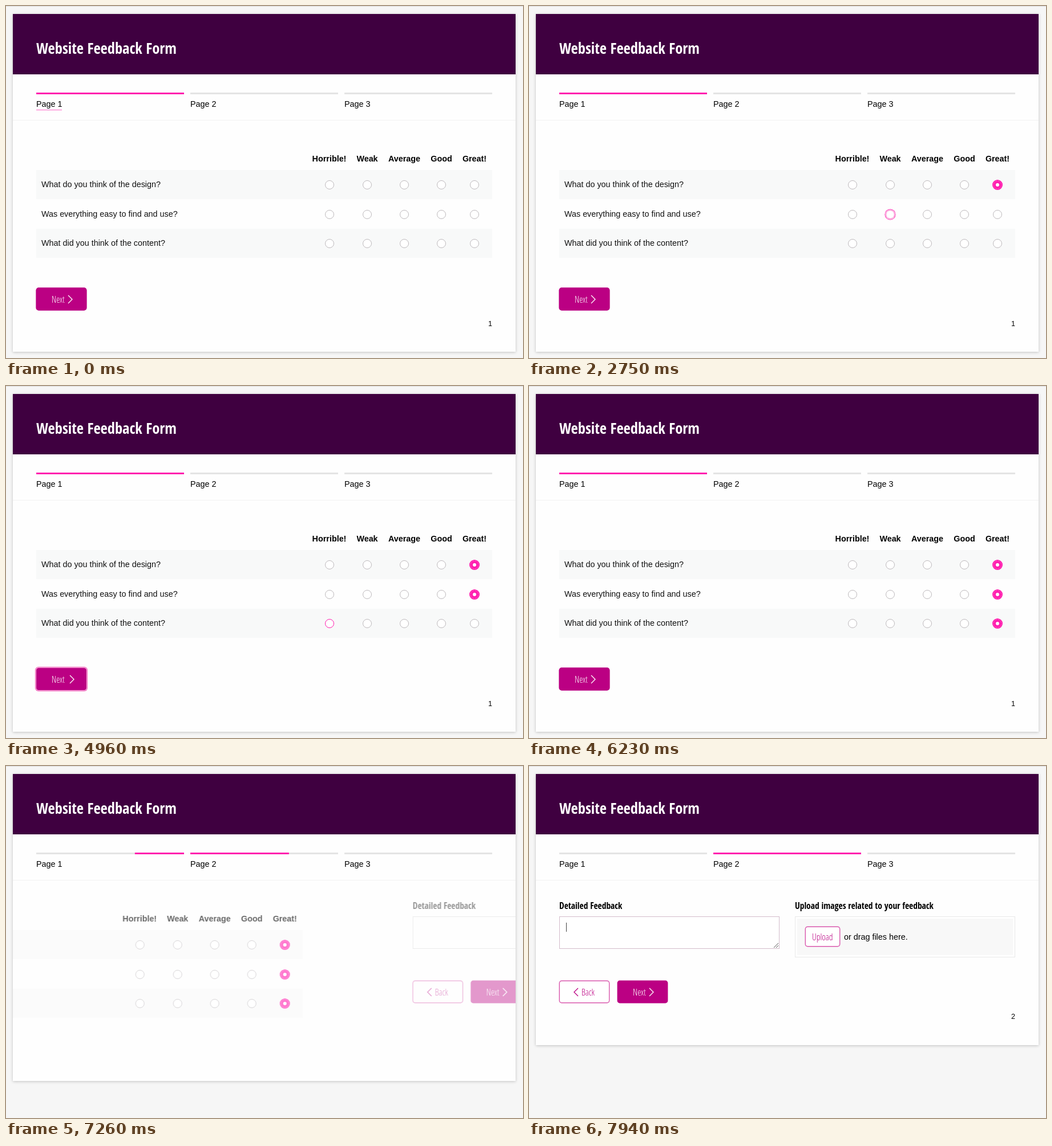
Recreate the animation shown at these times as an HTML page. Size 906 by 618 pixels, loop 7990 ms.

```html
<!DOCTYPE html>
<html lang="en">
<head>
<meta charset="utf-8">
<title>Website Feedback Form</title>
<style>
  :root { --pink: #ff1cae; --plum: #bb0083; }
  html, body { margin: 0; width: 100%; height: 100%; overflow: hidden; }
  body { position: relative; background: #f6f6f6; color: #000; font: 14.35px/20px "Liberation Sans", Arial, sans-serif; }
  * { box-sizing: border-box; }
  div, span, b, i, svg { position: absolute; white-space: nowrap; }
  .cond { font-family: "Open Sans Condensed", "Open Sans", sans-serif; font-stretch: 75%; font-size: 15.5px; font-weight: 700; }
  .edge { inset: 0 0 auto; height: 1px; background: #dcdcdc; }
  .card { left: 12px; top: 14px; width: 881px; height: 593px; overflow: hidden; background: #fefefe; box-shadow: 0 1px 5px rgba(0, 0, 0, .22); }
  .layer { left: -12px; top: -14px; width: 906px; height: 618px; }
  .head { left: 12px; top: 14px; width: 881px; height: 106px; background: #3f0040; }
  .title { left: 53px; top: 54px; font-size: 26.5px; line-height: 40px; color: #fff; }
  .rule { left: 12px; top: 200px; width: 881px; height: 1px; background: #f1f1f1; }
  .bar { top: 152px; width: 259px; height: 3px; overflow: hidden; background: #e4e4e4; }
  .fill { inset: 0; background: var(--pink); }
  .tab { top: 162px; height: 21px; }
  .tab i { left: 0; bottom: 0; width: 100%; height: 1px; background: #ff62c6; opacity: 0; }
  .col { top: 258px; width: 80px; text-align: center; }
  .band { left: 53px; width: 799px; height: 51px; background: #f8f9f9; }
  .ask { left: 62px; color: #111; }
  .radio { width: 16px; height: 16px; border: 1px solid #bdb9bc; border-radius: 50%; background: #fff; }
  .btn {
    --line: var(--plum);
    width: 88px; height: 39px; border: 1px solid var(--line); border-radius: 4px; box-shadow: 0 0 0 .4px var(--line);
    background: var(--plum); color: #fff; font-family: "Open Sans Condensed Light", "Open Sans", sans-serif; font-weight: 300;
  }
  .btn span { top: 9px; left: 26px; }
  .btn svg { top: 11px; left: 54px; }
  .btn.ghost { --line: #d958ad; background: #fff; color: var(--plum); }
  .back span { left: 38px; }
  .back svg { left: 24px; transform: scaleX(-1); }
  svg { fill: none; stroke: currentColor; stroke-width: 1.3; }
  .num { right: 54px; font-size: 12.5px; }
  .area { left: 53px; top: 264px; width: 386px; height: 57px; border: 1px solid #cfcfcf; background: #fff; }
  .caret { left: 11px; top: 10px; width: 1px; height: 16px; background: #444; }
  .drop { left: 466px; top: 264px; width: 386px; height: 72px; border: 1px solid #e8e8e8; background: #fff; }
  .drop div { inset: 3px; background: #f8f8f8; }
</style>
</head>
<body>
<div class="edge"></div>
<div class="card" id="card">
  <div class="layer" id="page1">
    <div class="band" style="top:288px"></div>
    <div class="band" style="top:391px"></div>
    <div class="cond btn" id="next" style="left:53px;top:495px"><span>Next</span>
      <svg id="arrow" width="9" height="16"><path d="M1 1l7 7-7 7"/></svg></div>
    <span class="num" id="num1" style="top:548px">1</span>
  </div>
  <div class="layer" id="page2">
    <b class="cond" style="left:53px;top:235px">Detailed Feedback</b>
    <div class="area" id="area"><i class="caret" id="caret"></i>
      <svg style="right:1px;bottom:1px;color:#555" width="8" height="8"><path d="M0 8L8 0M4 8l4-4" stroke-width="1"/></svg></div>
    <b class="cond" style="left:466px;top:235px">Upload images related to your feedback</b>
    <div class="drop"><div></div></div>
    <div class="cond btn ghost" style="left:484px;top:282px;width:61px;height:35px"><span style="left:11px;top:7px">Upload</span></div>
    <span style="left:552px;top:290px">or drag files here.</span>
    <div class="cond btn ghost back" style="left:53px;top:377px"><span>Back</span>
      <svg width="9" height="16"><path d="M1 1l7 7-7 7"/></svg></div>
    <div class="cond btn" style="left:155px;top:377px"><span>Next</span>
      <svg width="9" height="16"><path d="M1 1l7 7-7 7"/></svg></div>
    <span class="num" id="num2" style="top:430px">2</span>
  </div>
  <div class="layer" id="top">
    <div class="head"></div>
    <b class="cond title">Website Feedback Form</b>
    <div class="rule"></div>
  </div>
</div>
<script>
const LOOP = 7990, FADE = 220, PINK = '#ff1cae', PLUM = '#bb0083';
const $ = id => document.getElementById(id);

function add(parent, cls, left, top, text = '') {
  const el = document.createElement('div');
  el.className = cls;
  if (left != null) el.style.left = left + 'px';
  if (top != null) el.style.top = top + 'px';
  el.textContent = text;
  return parent.appendChild(el);
}

// Each key is [ms, style, easing towards the next key]; keys hold by default.
function play(el, ...keys) {
  const frames = keys.map(([ms, style, easing = 'steps(1, end)']) => ({ ...style, easing, offset: ms / LOOP }));
  frames.push({ ...keys[keys.length - 1][1], offset: 1 });
  el.animate(frames, { duration: LOOP, iterations: Infinity });
}

const show = (el, from, to = LOOP) => play(el,
  ...(from ? [[0, { opacity: 0 }]] : []), [from, { opacity: 1 }], ...(to < LOOP ? [[to, { opacity: 0 }]] : []));

const move = (el, start, span, easing, from, to) =>
  play(el, [0, from], [start, from, easing], [start + span, to]);

// Progress tabs
const tabTimes = [0, 190, 470, 670];
[53, 323, 593].forEach((x, i) => {
  const bar = add($('top'), 'bar', x);
  const tab = add($('top'), 'tab', x, null, 'Page ' + (i + 1));
  const line = tab.appendChild(document.createElement('i'));
  const [on, off] = tabTimes.slice(i);
  show(line, on, off);
  if (i) play(bar, [0, { background: '#e4e4e4' }], [on, { background: '#f3bcdd' }], [off, { background: '#e4e4e4' }]);
  if (i < 2) {
    const at = pct => ({ transform: `translateX(${pct}%)` });
    move(add(bar, 'fill'), 6845, 1068, 'ease', at(i ? -100 : 0), at(i ? 0 : 100));
  }
});

// Radio looks: border, inner fill, gap and outer ring
const look = (border, fill, gap, ring, gapColor = PINK) => ({
  borderColor: border,
  boxShadow: `inset 0 0 0 ${fill}px ${PINK}, 0 0 0 ${gap}px ${gapColor}, 0 0 0 ${ring}px ${PINK}`
});
const OFF = look('#bdb9bc', 0, 0, 0);
const FOCUS = look(PINK, 0, 0, 0);
const START = look('#f59ad2', 0, .8, 1.6, '#ffe3f4');
const ACTIVE = look(PINK, 4, .8, 1.6);
const CHECKED = look(PINK, 4, .8, .8);
const DROPPED = look(PINK, 4, 0, 0);

const columns = [['Horrible!', 566.5], ['Weak', 633], ['Average', 698], ['Good', 763], ['Great!', 821]];
const rows = [
  { ask: 'What do you think of the design?', y: 314, times: [670, 1150, 1390, 1640, 1880, 2350] },
  { ask: 'Was everything easy to find and use?', y: 365.5, times: [2350, 2750, 2930, 3110, 3290, 3820] },
  { ask: 'What did you think of the content?', y: 417, times: [4960, 5180, 5400, 5620, 5820, 6230], peek: 3820 }
];

columns.forEach(([name, x]) => add($('page1'), 'col', x - 40, null, name).style.fontWeight = 700);
rows.forEach(({ ask, y, times, peek }) => {
  add($('page1'), 'ask', null, y - 11, ask);
  columns.forEach(([, x], c) => {
    const radio = add($('page1'), 'radio', x - 8, y - 8);
    const on = times[c], off = times[c + 1];
    const keys = [[0, OFF]];
    if (!c) {
      if (peek) keys.push([peek, FOCUS], [peek + 200, FOCUS, 'ease'], [peek + 400, OFF]);
      keys.push([on, FOCUS], [off, OFF]);
    } else {
      keys.push([on, START, 'ease'], [Math.min(on + FADE, off - 1), ACTIVE]);
      if (c < 4) keys.push([off, DROPPED, 'ease'], [off + FADE, OFF]);
      else keys.push([off, CHECKED]);
    }
    play(radio, ...keys);
  });
});

// Next button focus
const toggle = (el, idle, lit) => play(el,
  [0, idle], [4010, idle, 'ease'], [4240, lit],
  [4960, lit, 'ease'], [5160, idle], [6240, idle, 'ease'], [6490, lit]);
const ring = (a, inner, b, outer) => ({ boxShadow: `0 0 0 ${a}px ${inner}, 0 0 0 ${b}px ${outer}` });
toggle($('next'), ring(.4, PLUM, .4, PLUM), ring(1, '#ffc4e8', 2, '#ee55b2'));
toggle($('arrow'), { transform: 'translateX(0)' }, { transform: 'translateX(3px)' });

// Page change
const slide = x => ({ transform: `translateX(${x}px)` });
[['page1', 0, -992], ['page2', 992, 0]].forEach(([id, from, to]) => {
  move($(id), 6855, 1010, 'ease-in-out', slide(from), slide(to));
  move($(id), 6855, 1010, 'linear', { opacity: from ? 0 : 1 }, { opacity: to ? 0 : 1 });
});
move($('card'), 6845, 1050, 'cubic-bezier(.4, .3, .6, 1)', { height: '593px' }, { height: '476px' });
show($('num1'), 0, 6830);
show($('num2'), 7880);
show($('caret'), 7880);
play($('area'), [0, { borderColor: '#cfcfcf' }], [7880, { borderColor: '#d3bccb' }]);
</script>
</body>
</html>
```
